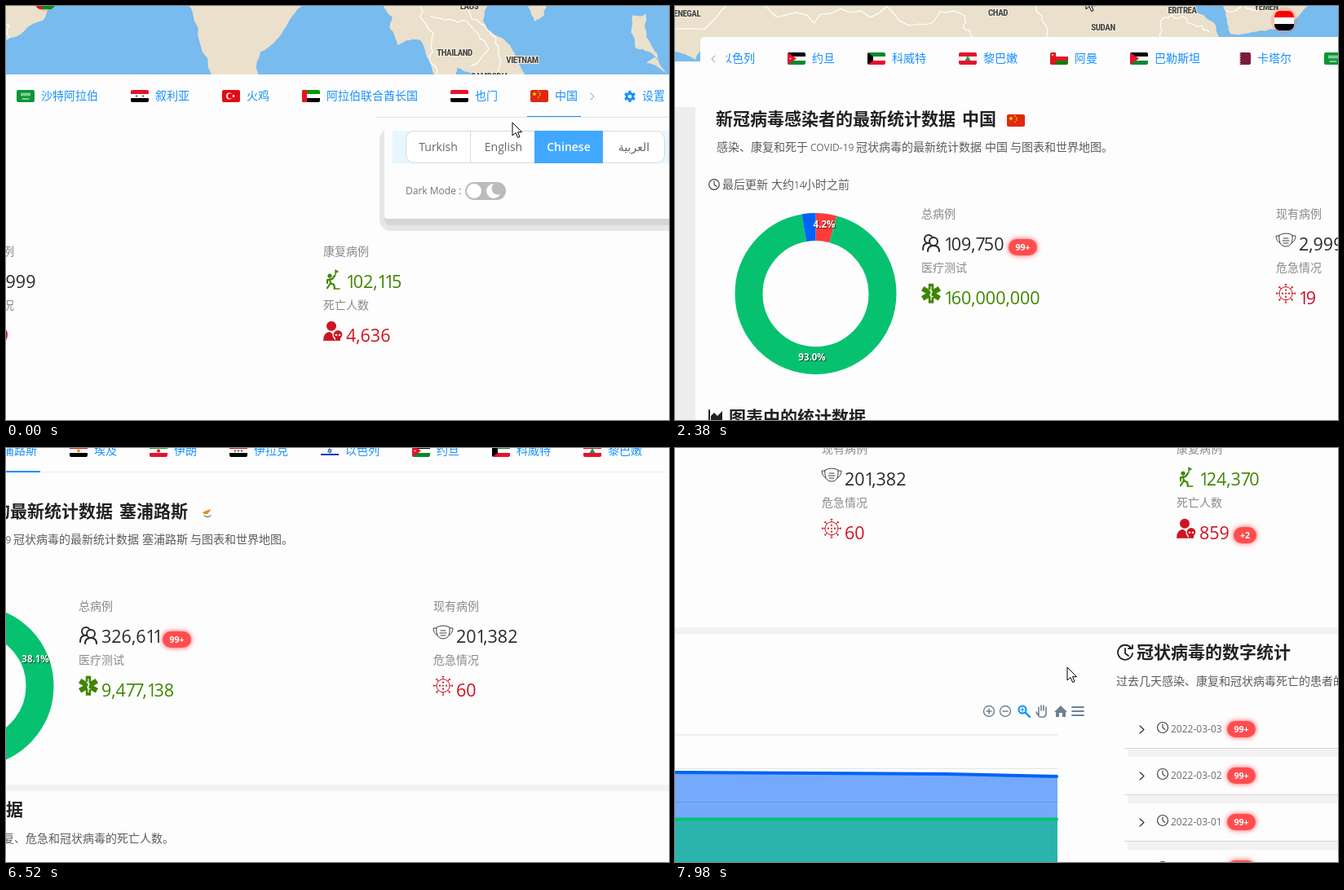
An HTML page for the animation above (8000 ms loop, 813 by 508 pixels).

```html
<!DOCTYPE html>
<html lang="zh">
<head>
<meta charset="utf-8">
<style>
html, body { margin: 0; width: 100%; height: 100%; overflow: hidden; background: #fdfdfd }
svg { display: block; width: 813px; height: 508px; font: 14px "Open Sans", "Noto Sans CJK SC", "Noto Sans CJK", sans-serif }
.tab { fill: #1890ff }
.h { font-size: 21px; font-weight: 700; fill: #222 }
.sub { font-weight: 300; fill: #5c5c5c }
.latin { font-size: 12px; fill: #6c6c6c }
.label { font-weight: 300; fill: #8a8a8a }
.num { font-size: 21.5px }
.pct, .badge { font-size: 11.5px; font-weight: 700; fill: #fff; text-anchor: middle }
.pct { text-shadow: 1px 1px 1px #000a }
.badge { font-size: 10.5px }
.place { font: 700 11px "Roboto Condensed", "Roboto", sans-serif; font-stretch: condensed; letter-spacing: -.45px; text-anchor: middle; fill: #444; stroke: #f4ecdc; stroke-width: 2; paint-order: stroke }
.mid { text-anchor: middle; fill: #666 }
</style>
</head>
<body>
<svg id="stage" viewBox="0 0 813 508"></svg>
<script>
const RED = '#cf1322', GREEN = '#3f8600', DARK = '#2b2b2b', GREY = '#6e8192';
const clamp = v => Math.max(0, Math.min(1, v));
const ramp = (t, a, b) => clamp((t - a) / (b - a));
const mix = (a, b, p) => a + (b - a) * p;
const times = (n, f) => Array.from({ length: n }, (_, i) => f(i));
const repeat = (n, f) => times(n, f).join('');

const text = (x, y, s, cls = '', more = '') => `<text x="${x}" y="${y}" class="${cls}" ${more}>${s}</text>`;
const rect = (x, y, w, h, fill, more = '') => `<rect x="${x}" y="${y}" width="${w}" height="${h}" fill="${fill}" ${more}/>`;
const circle = (x, y, r, fill, more = '') => `<circle cx="${x}" cy="${y}" r="${r}" fill="${fill}" ${more}/>`;
const path = (d, fill) => `<path d="${d}" fill="${fill}"/>`;
const line = (d, color, w = 1.5) => `<path d="${d}" fill="none" stroke="${color}" stroke-width="${w}" stroke-linecap="round" stroke-linejoin="round"/>`;
const loopLine = (x, y, r, color, w) => circle(x, y, r, 'none', `stroke="${color}" stroke-width="${w}"`);
const group = (x, y, s, more = '') => `<g transform="translate(${x} ${y})" ${more}>${s}</g>`;
const spin = (n, s, x = 0, y = x) => repeat(n, i => `<g transform="rotate(${i * 360 / n} ${x} ${y})">${s}</g>`);

// ---- flags, 22 x 15 ----
const bars = (...colors) => colors.map((c, i) => rect(0, i * 5, 22, 5, c)).join('');
const R = '#e8112d', K = '#000', W = '#fff', G = '#078930';
const wedge = c => path('M0 0 11 7.5 0 15Z', c);
const saw = (x, c) => path(`M22 0H${x}${'l2 1.5-2 1.5'.repeat(5)}H22Z`, c);
const dots = (n, x, step, r, c) => repeat(n, i => circle(x + step * i, 7.5, r, c));
const flags = {
  bh: saw(6, '#ce1126'),
  cy: path('M5 7 9 5 16 3 11 9 7 9Z', '#e88a1c') + line('M7 11q4 3 8 0', '#6f8f6a'),
  eg: bars(R, W, K) + dots(1, 11, 0, 2, '#c9a02c'),
  ir: bars('#239f40', W, R) + dots(1, 11, 0, 2, R),
  iq: bars(R, W, K) + dots(3, 7, 4, 1.2, '#2a8d55'),
  il: rect(0, 2, 22, 2, '#0038b8') + rect(0, 11, 22, 2, '#0038b8') + line('M11 5 13 9H9ZM11 10 9 6h4Z', '#0038b8', .7),
  jo: bars(K, W, G) + wedge(R) + dots(1, 3.5, 0, 1, W),
  kw: bars(G, W, R) + path('M0 0 7 5V10L0 15Z', K),
  lb: bars(R, W, R) + path('M11 4 14.5 10h-7Z', '#00a651'),
  om: bars(W, R, '#008000') + rect(0, 0, 7, 15, '#db161b') + circle(3, 3, 1.3, '#f4a9a9'),
  ps: bars(K, W, G) + wedge(R),
  qa: saw(8, '#7b1a3f'),
  sa: rect(0, 0, 22, 15, '#0a9635') + line('M6 4v3' + 'm2-3v3'.repeat(5) + 'M7 11h8', W, 1),
  sy: bars(R, W, K) + dots(2, 7, 8, 1.3, '#3b8a78'),
  tr: rect(0, 0, 22, 15, '#e30a17') + dots(1, 9, 0, 4, W) + dots(1, 10.2, 0, 3.2, '#e30a17') + dots(1, 14, 0, 1.4, W),
  ae: bars('#009a00', W, K) + rect(0, 0, 6, 15, R),
  ye: bars(R, W, K),
  cn: rect(0, 0, 22, 15, '#de2910') + spin(5, path('M5 2 6.2 5.5H3.8Z', '#ffde00'), 5, 5) +
    repeat(4, i => circle(10 + 2 * Math.sin(i * Math.PI / 3), 2 + 2.4 * i, .8, '#ffde00'))
};
const flag = (code, x, y) => group(x, y, flags[code], 'clip-path="url(#flagClip)"');

// ---- icons, 24 x 24 ----
const clock = (x, y, r) => loopLine(x, y, r, '#444', 1.2) + line(`M${x} ${y - r * .6}V${y}l${r * .45} ${r * .4}`, '#444', 1.2);
const icons = {
  people: loopLine(9, 8, 5, DARK, 2) + line('M2 21q0-8 6-8', DARK, 2) +
    circle(15, 11, 5, '#fdfdfd', `stroke="${DARK}" stroke-width="2"`) + line('M8 23q0-7 7-7t7 7', DARK, 2),
  care: spin(6, rect(8.8, 0, 6.4, 12, GREEN), 12) + line('M12 4v16M10 8q5 1 2 4t2 4', W, 1.2),
  mask: line('M4 3Q12-1 20 3V9Q19 17 12 17 5 17 4 9ZM4 4H0Q0 10 5 13M20 4h4Q24 10 19 13M9 7h6M8 10h8M9 13h6', '#444', 1),
  virus: loopLine(12, 12, 8, RED, 1) + spin(8, line('M12 4V1M11 .7h2', RED, 1), 12) + spin(4, circle(12, 8, 1.1, RED), 12) + circle(12, 12, 1, RED),
  golfer: circle(8, 7, 2.6, GREEN) + line('M5 12 11 11 14 7M8 11 9 16 5 22M9 16 13 18 14 22M5 12V16', GREEN, 2.2) + line('M15 6V0l3 2-3 1M13 23h7', GREEN, 1.4),
  dead: circle(10, 6, 6, RED) + path('M0 24q0-10 8-11l4 3 3 8Z', RED) + circle(18, 17, 6.6, '#fdfdfd') + circle(18, 16.5, 5.3, RED) +
    rect(15, 20, 6, 4, RED) + circle(16, 17, 1.3, W) + circle(20, 17, 1.3, W)
};
const badge = (x, y, s, w = 35) => rect(x, y - 10, w, 20, '#ff4d4f', 'rx="10" filter="url(#glow)"') + text(x + w / 2, y + 4, s, 'badge');
const tight = { 1: -3.6, 7: -2 };
const number = (x, y, s, c) => text(x, y, s.replace(/[17]/g, d => `<tspan letter-spacing="${tight[d]}">${d}</tspan>`), 'num', `fill="${c}"`);

// ---- map strip: a few key points, roughened by midpoint displacement ----
let seed = 7;
const rnd = () => (seed = seed * 16807 % 2147483647) / 2147483647 - .5;
function rough(points, jag, depth = 3) {
  const p = points.split(' ').map(s => s.split(',').map(Number));
  const split = q => q.flatMap((a, i) => {
    const b = q[i + 1];
    if (!b) return [a];
    const dx = b[0] - a[0], dy = b[1] - a[1], k = jag * rnd();
    return [a, [(a[0] + b[0]) / 2 - dy * k, (a[1] + b[1]) / 2 + dx * k]];
  });
  let q = p;
  while (depth--) q = split(q);
  return 'M' + q.map(v => v.map(n => n.toFixed(1))).join(' ');
}
const land = points => path(rough(points, .22) + 'Z', '#ebe0cb');
const border = points => line(rough(points, .5), '#fff', 1.2);
const place = (x, y, s) => text(x, y + 4, s, 'place');
const marker = (x, y, s) => circle(x, y, 15, '#f66', 'class="ripple"') + group(x - 12, y - 12, s, 'clip-path="url(#pin)"');
const map = rect(0, -60, 1600, 128, '#78bbee') +
  land('0,-70 600,-70 608,-38 633,4 662,22 667,38 640,50 35,50 25,66 0,56') +
  land('645,-68 648,-36 672,-2 681,34 701,34 747,24 783,-4 828,-28 850,-68') +
  land('1000,-78 1012,-38 1035,38 1092,38 1095,10 1123,-16 1150,-48 1155,-78') +
  land('1238,-76 1246,-46 1257,-32 1254,-18 1263,2 1275,-4 1291,-4 1303,24 1310,46 1331,44 1336,30 1373,44 1420,42 1401,2 1368,-28 1380,-76') +
  land('1423,-46 1433,-52 1446,-46 1443,-34 1431,-27 1423,-46') +
  land('1551,-34 1568,-36 1568,-8 1583,20 1571,10 1555,6 1551,-34') + land('1568,24 1578,16 1595,38 1568,24') +
  border('0,28 125,14 215,8 300,22 355,12 365,38') + border('455,38 450,12 435,-8') + border('595,38 600,14 633,22 655,32') +
  border('675,6 720,4 737,-18 780,-34 787,-8') + border('1291,-46 1305,0 1311,38') + border('1303,-34 1348,-28 1375,6 1353,28') +
  border('1338,-46 1373,-16 1387,6 1383,38') +
  place(12, 9, 'SENEGAL') + place(396, 8, 'CHAD') + place(525, 26, 'SUDAN') + place(622, 5, 'ERITREA') + place(725, 1, 'YEMEN') +
  place(1333, 11, 'THAILAND') + place(1416, 20, 'VIETNAM') + place(1351, -46, 'LAOS') + place(1376, 40, 'CAMBODIA') +
  marker(747, 18, rect(0, 0, 24, 8, '#f00') + rect(0, 8, 24, 8, W) + rect(0, 16, 24, 8, K)) +
  marker(831, -54, rect(0, 0, 24, 24, '#db161b') + rect(8, 16, 16, 8, '#008f1f'));

// ---- tabs ----
let tabX = 67;
const tabs = 'bh巴林 cy塞浦路斯 eg埃及 ir伊朗 iq伊拉克 il以色列 jo约旦 kw科威特 lb黎巴嫩 om阿曼 ps巴勒斯坦 qa卡塔尔 sa沙特阿拉伯 sy叙利亚 tr火鸡 ae阿拉伯联合酋长国 ye也门 cn中国'
  .split(' ').map(s => {
    const name = s.slice(2), x = tabX;
    tabX += 70 + 14 * name.length;
    return flag(s.slice(0, 2), x, 57) + text(x + 30, 69, name, 'tab');
  }).join('');

// ---- statistics: three columns of two ----
const cells = [['总病例', 'people', DARK], ['医疗测试', 'care', GREEN], ['现有病例', 'mask', DARK],
  ['危急情况', 'virus', RED], ['康复病例', 'golfer', GREEN], ['死亡人数', 'dead', RED]];
const countries = [
  { code: 'cn', name: '中国', hours: 14, values: '109,750 160,000,000 2,999 19 102,115 4,636',
    extra: badge(409, 296, '99+'), tab: 1999, pct: [[183, 272, '4.2%'], [168, 435, '93.0%']] },
  { code: 'cy', name: '塞浦路斯', hours: 16, values: '326,611 9,477,138 201,382 60 124,370 859',
    extra: badge(405, 296, '99+') + badge(1242, 361, '+2', 28), tab: 165, pct: [[249, 324, '38.1%'], [96, 383, '61.7%']] }];
const stats = c => {
  const n = c.name.length, values = c.values.split(' ');
  return text(50, 146, '新冠病毒感染者的最新统计数据', 'h') + text(352, 146, c.name, 'h') + flag(c.code, 365 + 21 * n, 133) +
    text(51, 178, '感染、康复和死于', 'sub') + text(166, 178, 'COVID-19', 'latin') + text(222, 178, '冠状病毒的最新统计数据', 'sub') +
    text(380, 178, c.name, 'sub') + text(383 + 14 * n, 178, '与图表和世界地图。', 'sub') +
    clock(48, 219, 6.3) + text(58, 224, '最后更新', 'sub') + text(118, 224, '大约', 'sub') + text(146, 224, c.hours, 'latin') + text(158, 224, '小时之前', 'sub') +
    cells.map(([label, icon, color], i) => {
      const x = 302 + 435 * (i >> 1), y = 66 * (i % 2);
      return text(x, 260 + y, label, 'label') + group(x, 278 + y * .95, icons[icon]) + number(x + 28, 300 + y, values[i], color);
    }).join('') + c.extra;
};

// ---- lower sections ----
const toolbar = loopLine(0, 0, 6.5, GREY, 1.4) + line('M-3 0h6M0-3v6', GREY) + loopLine(20, 0, 6.5, GREY, 1.4) + line('M17 0h6', GREY) +
  loopLine(41, -2, 4.5, '#008ffb', 2) + line('M45 2 50 7', '#008ffb', 2.4) + line('M39-2h4M41-4v4', '#008ffb', 1.2) +
  line('M61 6 58 1M61 6V-5M64-1V-7M67-1V-7M70 0V-5V4L68 7H62', GREY, 1.6) +
  path('M80 1 88-7 96 1H94V7H90V2H86V7H82V1Z', GREY) + repeat(3, i => line(`M102 ${5 * i - 5}h14`, GREY, 1.8));
const chart = repeat(2, i => line(`M90 ${606 + 41.5 * i}H1026`, '#e4e4e4', 1)) +
  path('M90 652H557L890 654 1026 657V780H90Z', '#75a9fb') + line('M90 688.5H1026', '#6b98e0', 1) + rect(90, 709, 936, 80, '#2bb3ae') +
  line('M90 652H557L890 654 1025 657', '#0063f7', 4) + line('M90 709.5H1025', '#06c270', 4);
const days = repeat(4, i => {
  const y = 599 + 57 * i, date = new Date(Date.UTC(2022, 2, 3 - i)).toISOString().slice(0, 10);
  return rect(1108, y + 23, 500, 1, '#d6d6d6') + rect(1112, y + 24, 500, 10, '#f2f2f2') + line(`M1127 ${y - 4}l5 4.5-5 4.5`, '#333', 1.2) +
    clock(1155, y - 2, 6.5) + text(1165, y + 4, date, 'latin') + badge(1234, y, '99+');
});
const lower = line('M42 496V513H60', '#222', 2) + path('M44 512V503L48 499 52 503 58 497V512Z', '#222') + text(66, 512, '图表中的统计数据', 'h') +
  text(419, 545, '每天感染、康复、危急和冠状病毒的死亡人数。', 'sub', 'text-anchor="end"') +
  line('M1116 499A9 9 0 1 0 1118 506M1113 500h5v-4M1109 500v6l4 3', '#222', 1.8) + text(1123, 512, '冠状病毒的数字统计', 'h') +
  text(1098, 545, '过去几天感染、康复和冠状病毒死亡的患者的统计数据。', 'sub') + group(942, 577, toolbar) + chart + days;

// ---- settings menu ----
const settings = group(1548, 65, spin(6, rect(-1.6, -7, 3.2, 7, '#1890ff')) + circle(0, 0, 5.3, '#1890ff') + circle(0, 0, 2.3, W)) + text(1563, 69, '设置', 'tab');
const menu = rect(458, 150, 380, 126, '#e6e6e6', 'rx="14"') + rect(464, 150, 380, 119, '#d6d6d6', 'rx="8"') + rect(464, 137, 380, 124, '#fdfdfd', 'rx="4"') +
  rect(453, 136, 360, 1, '#e4e4e4') + rect(474, 153, 350, 40, '#e6f7ff') + rect(490.5, 153.5, 317, 39, W, 'rx="10" stroke="#d9d9d9"') +
  rect(569, 153, 1, 40, '#d9d9d9') + rect(648, 153, 84, 40, '#40a9ff') +
  ['Turkish', 'English', 'Chinese', 'العربية'].map((s, i) => text(530 + 80 * i, 178, s, 'mid', i === 2 ? 'style="fill:#fff" font-weight="600"' : '')).join('') +
  text(490, 231, 'Dark Mode :', '', 'font-size="12" fill="#777"') + rect(563, 216, 50, 22, '#bbb', 'rx="11"') +
  circle(574, 227, 9, W) + circle(598, 227, 9, W) + circle(603, 224, 7.5, '#bbb');

const outlined = d => `<path d="${d}" fill="#fff" stroke="#000"/>`;
const cursors = {
  arrow: outlined('M0 0V16L4 12.5 6.6 18.5 9 17.5 6.5 11.7H11.5Z'),
  hand: outlined('M-1 1Q1-1 3 1V7L12 9Q14 10 13 14L11 19H1L-5 11Q-5 8-1 11Z'),
  no: circle(0, 0, 6.7, W, 'stroke="#e0001b" stroke-width="2.6"') + line('M-4-4 4 4', '#e0001b', 2.6)
};

const stage = document.getElementById('stage');
stage.innerHTML = `<defs>
  <clipPath id="flagClip"><rect width="22" height="15" rx="2"/></clipPath>
  <clipPath id="pin"><rect width="24" height="24" rx="7"/></clipPath>
  <clipPath id="tabClip"><rect x="63" y="40" width="1427" height="60"/></clipPath>
  <filter id="glow" x="-50%" y="-50%" width="200%" height="200%"><feDropShadow dx="0" dy="0" stdDeviation="3" flood-color="#ff4d4f"/></filter>
  </defs><g id="cam">` + map + rect(31, 38, 1600, 900, '#fdfdfd', 'rx="5"') + rect(0, 68, 31, 800, '#fdfdfd') + rect(0, 124, 25, 800, '#ededed') +
  `<g id="bands">${rect(31, 90, 1600, 1, '#f0f0f0')}${rect(31, 474, 1600, 8, '#f2f2f2')}</g>
  <g clip-path="url(#tabClip)"><g id="tabs">${tabs}<rect id="ink" y="89" height="2" fill="#1890ff"/></g></g>` +
  line('M49 61l-4 4 4 4M1500 61l4 4-4 4', '#999', 1) + settings + `<g id="stats"></g><g id="donut"></g>` + lower +
  `</g><g id="menu">${menu}</g><g id="cursor"></g>`;
const el = id => document.getElementById(id);
const move = (id, x, y) => el(id).setAttribute('transform', `translate(${Math.round(x)} ${Math.round(y)})`);

// ---- motion ----
// [start, end, x, y]: the pointer glides to x, y between the two times
const glides = [[0, 1870, 504, -12], [2500, 3200, 43, 58], [3960, 4800, 205, 60], [5000, 5780, 290, -7], [5900, 7500, 481, 269]];
const pointer = t => glides.reduce(([x, y], [a, b, tx, ty]) => [mix(x, tx, ramp(t, a, b)), mix(y, ty, ramp(t, a, b))], [621, 143]);
const pointerKind = t => t < 2700 || t >= 7260 ? 'arrow' : t >= 5900 ? '' : t >= 3720 && t < 4080 ? 'no' : 'hand';
function camera(t) {
  const p = ramp(t, 1340, 2380);
  return [-783 * (1 - p ** 1.59) - 557 * ramp(t, 5780, 7663),
    46 * (1 - p ** 2.6) - 81 * ramp(t, 5900, 6700) - 173 * ramp(t, 7260, 7740)];
}

// the screen refreshes every 120 ms, counted anew from each of these times
const runs = [0, 740, 1480, 1750, 2020, 3000, 5060, 5900, 6800, 6960, 7110, 7260];
const refresh = t => {
  const from = runs.findLast(r => r <= t + .5);
  return from + Math.floor((t + .5 - from) / 120) * 120;
};

const arc = (a, b, c) => circle(172.5, 353, 82, 'none', `stroke="${c}" stroke-width="34" pathLength="360" stroke-dasharray="0 ${a} ${b - a} 360" transform="rotate(-90 172.5 353)"`);
let shown;
function draw(t) {
  move('cam', ...camera(t));
  const s = ramp(t, 3120, 3840);
  move('tabs', -573 * (1 - s * s * (3 - 2 * s)), 0);
  el('bands').style.display = t < 5900 ? 'none' : '';
  el('menu').style.opacity = 1 - ramp(t, 860, 1100);

  const c = countries[t < 4900 ? 0 : 1];
  if (c !== shown) {
    shown = c;
    el('stats').innerHTML = stats(c);
    el('ink').setAttribute('x', c.tab - 4);
    el('ink').setAttribute('width', 38 + 14 * c.name.length);
  }
  const p = ramp(t, 4900, 6600), red = mix(15.1, .6, clamp(p * 2)), end = mix(350, 138, p ** 2.2);
  const gap = p > 0 && p < 1 ? 2 : 0;
  el('donut').innerHTML = arc(0, red, '#ff3b3b') + arc(red, end, '#06c270') + arc(end + gap, 360, '#0063f7') +
    c.pct.map(([x, y, s]) => text(x, y, s, 'pct')).join('');

  const phase = t % 960 / 960;
  stage.querySelectorAll('.ripple').forEach(r => {
    r.setAttribute('r', 14 + 5 * phase);
    r.setAttribute('opacity', .4 * (1 - phase * .8));
  });
  move('cursor', ...pointer(t));
  el('cursor').innerHTML = cursors[pointerKind(t)] || '';
}

let start, last;
function loop(now) {
  start ??= now;
  const t = refresh((now - start) % 8000);
  if (t !== last) draw(last = t);
  requestAnimationFrame(loop);
}
draw(0);
requestAnimationFrame(loop);
</script>
</body>
</html>
```
